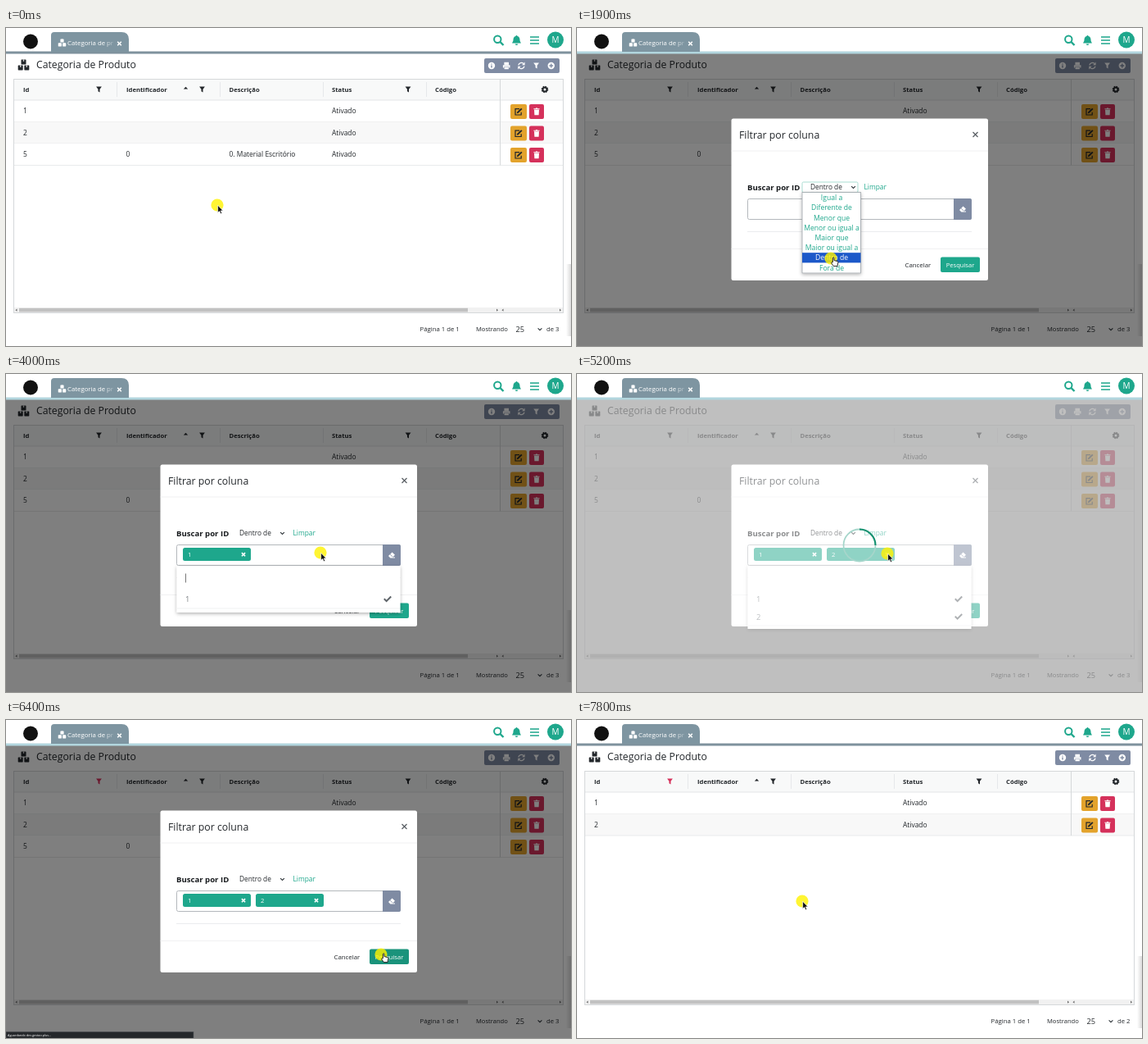
These frames come from a looping animation (690 px wide and 388 px high, 7900 ms). An HTML page:

```html
<!DOCTYPE html>
<html lang="pt">
<head>
<meta charset="utf-8">
<title>Filtrar por coluna</title>
<style>
html, body { margin: 0; width: 100%; height: 100%; overflow: hidden; background: #fff; }
svg { display: block; width: 100%; height: 100%; }
text { font-family: "Open Sans", "Noto Sans", sans-serif; white-space: pre; }
</style>
</head>
<body>
<svg id="stage" viewBox="0 0 690 388" xmlns="http://www.w3.org/2000/svg"></svg>
<script>
const LOOP = 7900, STEP = 100;
const TEAL = '#1ea78c', INK = '#23272b', SLATE = '#7f8ba3', RED = '#d5315b';

// Markup helpers
const text = (x, y, size, str, fill = INK, extra = '') =>
  `<text x="${x}" y="${y}" font-size="${size}" fill="${fill}" ${extra}>${str}</text>`;
const rect = (x, y, w, h, fill, extra = '') =>
  `<rect x="${x}" y="${y}" width="${w}" height="${h}" fill="${fill}" ${extra}/>`;
const path = (d, fill, extra = '') => `<path d="${d}" fill="${fill}" ${extra}/>`;
const line = (d, color, width = 1, extra = '') =>
  path(d, 'none', `stroke="${color}" stroke-width="${width}" ${extra}`);
const at = (x, y, body, scale = 1) => `<g transform="translate(${x} ${y}) scale(${scale})">${body}</g>`;
const group = (id, body, extra = '') => `<g id="${id}" ${extra}>${body}</g>`;
const BOLD = 'font-weight="700"', MID = 'text-anchor="middle"';

// Icons, centred on the origin
const funnel = fill => path('M-3.4-3.4H3.4L1-.2V3.6L-1 2.2V-.2Z', fill, 'stroke="currentColor" stroke-width="0"');
const cross = (r, color, w) => line(`M${-r} ${-r}L${r} ${r}M${r} ${-r}L${-r} ${r}`, color, w);
const chevron = line('M-2.4-1.2L0 1.2L2.4-1.2', '#30363b', 1.1);
const tick = line('M-4.2 0L-1.4 2.8L4.2-2.8', '#5d6368', 2);
const box = (x, y) => rect(x, y, 6, 6, 'currentColor', 'rx=".6"') + rect(x + 2.3, y, 1.4, 2.4, '#fff', 'opacity=".8"');
const boxes = color => `<g color="${color}">${box(-3, -6.6)}${box(-6.8, .4)}${box(.8, .4)}</g>`;
const gear = `<circle r="2.5" fill="none" stroke="${INK}" stroke-width="2"/>` +
  `<circle r="3.7" fill="none" stroke="${INK}" stroke-width="1.2" stroke-dasharray="1.6 1.306"/>`;
const search = `<circle cx="-1.2" cy="-1.2" r="4.2" fill="none" stroke="${TEAL}" stroke-width="2"/>` +
  line('M2 2L6 6', TEAL, 2.4);
const bell = path('M0-6C.8-6 1-5.4 1-5C3.4-4.5 4-2.6 4-.6C4 1.8 5.4 2.4 5.4 3.6H-5.4C-5.4 2.4-4 1.8-4-.6C-4-2.6-3.4-4.5-1-5C-1-5.4-.8-6 0-6ZM-1.6 4.4H1.6A1.6 1.6 0 0 1-1.6 4.4Z', TEAL);
const bars = line('M-5.5-4H5.5M-5.5 0H5.5M-5.5 4H5.5', TEAL, 1.7);
const disc = mark => `<circle r="4.2" fill="#fff"/>` + line(mark, SLATE, 1.4);
const printer = path('M-2.8-4.2H2.8V-1H-2.8ZM-4.3-.8H4.3V2.6H3V1.2H-3V2.6H-4.3ZM-2.6 1.8H2.6V4.2H-2.6Z', '#fff');
const refresh = line('M-3.6-.7A3.7 3.7 0 0 1 2.6-2.6M3.6.7A3.7 3.7 0 0 1-2.6 2.6', '#fff', 1.3) +
  path('M4.2-4.4V-.8H.7ZM-4.2 4.4V.8H-.7Z', '#fff');
const pencil = line('M1-3.3H-4V4H3.2V.8', INK, 1.2) + line('M-1 1L3.8-3.6', INK, 2) + path('M-2.2 2.2L-1.8.1L0 1.8Z', INK);
const trash = path('M-3.6-3.8H-1.2L-.8-4.5H.8L1.2-3.8H3.6V-2.8H-3.6ZM-3-2.2H3L2.6 4.2H-2.6Z', '#fff');
const eraser = path('M-4 1L.6-3.6L4-.2L1.2 2.6H4V3.6H-1.6Z', '#fff') + line('M-1.8-.9L1.4 2.2', SLATE, .8);

const row = (n, label, y, extra = '', fill = '#fff') =>
  rect(10, y, 670, 26.5, fill) +
  text(21, y + 16.2, 8.45, label) + text(398, y + 16.2, 8.45, 'Ativado') + extra +
  line(`M10 ${y + 26.5}H680`, '#e4e6e8', .8) +
  rect(616, y + 5, 20, 18, '#e3a32c', 'rx="2"') + at(626, y + 14, pencil) +
  rect(639, y + 5, 18, 18, RED, 'rx="2"') + at(648, y + 14, trash);

const heading = (x, label) => text(x, 78.2, 7.7, label, INK, BOLD);
const arrow = (x, dir) => path(`M${x - dir} 342.6L${x + dir} 344.2L${x - dir} 345.8Z`, '#666');

function pageMarkup() {
  const tools = [disc('M0-2.6V-1.4M0-.5V2.5'), printer, refresh, funnel('#fff'), disc('M-2.4 0H2.4M0-2.4V2.4')];
  return rect(0, 29, 690, 359, '#fff') +
    at(21.5, 45, boxes(INK)) + text(37, 49.2, 12.25, 'Categoria de Produto') +
    rect(584, 37, 92, 18, SLATE, 'rx="2"') +
    tools.map((icon, i) => at(593 + i * 18.2, 46, icon)).join('') +
    rect(10, 62, 670, 26, '#f8f9f9') +
    row(1, '1', 88) + row(2, '2', 114.5, '', '#f8f8f8') +
    group('row5', row(3, '5', 141, text(146.5, 157.2, 8.45, '0') + text(272.5, 157.2, 8.45, '0. Material Escritório'))) +
    line('M10 88H680', '#dcdfe1', .8) +
    heading(21, 'Id') + heading(147, 'Identificador') + heading(272.5, 'Descrição') +
    heading(398, 'Status') + heading(524, 'Código') +
    group('focus', rect(102.5, 66.5, 22, 17, 'none', 'rx="2" stroke="#c9ecec"')) +
    group('idFilter', at(113.5, 75, funnel('inherit')).replace('fill="inherit"', '')) +
    at(239.5, 75, funnel(INK)) + at(491, 75, funnel(INK)) + at(658, 75, gear) +
    path('M216.8 74.6L219.5 71.8L222.2 74.6Z', INK) +
    line('M135.5 66V84M261.5 66V84M387.5 66V84M513.5 66V84', '#e1e4e6', .8) +
    `<path id="pin" stroke="#d5d8da"/>` +
    rect(10, 341, 670, 6, '#f1f1f1') + rect(16, 341.8, 548, 4.6, '#c1c1c1') +
    arrow(12.5, -1) + arrow(600, 1) + arrow(606.5, -1) + arrow(677, 1) +
    rect(9.5, 62.5, 671, 285, 'none', 'stroke="#d5d8da"') +
    text(505.5, 370.2, 7.75, 'Página 1 de 1') + text(574, 370.2, 7.6, 'Mostrando') +
    text(622.5, 371, 9.2, '25') + at(652, 367.5, chevron) +
    `<text id="total" x="660" y="370.2" font-size="7.7" fill="${INK}"></text>` +
    rect(684, 288, 6, 88, 'url(#edge)');
}

function headerMarkup() {
  return rect(0, 0, 690, 29, '#fff') + rect(0, 28.5, 690, 3, '#7e929d', 'id="rule"') +
    '<circle cx="30" cy="16.5" r="9" fill="#111"/>' +
    path('M55 29V9Q55 5 59 5H141Q150 5 150 14V29Z', '#7e95a1') +
    at(68.5, 18, boxes('#fff'), .7) +
    text(75, 20.6, 7.8, 'Categoria de pr', 'url(#fade)') +
    at(138.5, 19, cross(2.3, '#fff', 1.6)) +
    at(601.5, 15, search) + at(623.5, 15, bell) + at(645.5, 15, bars) +
    `<circle cx="671" cy="14.5" r="10" fill="${TEAL}"/>` + text(671, 18.2, 10, 'M', '#fff', MID);
}

const tag = (id, x, label) => group(id, rect(x, 212, 83, 16, TEAL, 'rx="2.5"') +
  text(x + 6, 222.8, 7.6, label, '#fff') + at(x + 74, 220.2, cross(2.1, '#fff', 1.6)));

const OPTIONS = ['Igual a', 'Diferente de', 'Menor que', 'Menor ou igual a',
  'Maior que', 'Maior ou igual a', 'Dentro de', 'Fora de'];
const LIST_TOP = 201, OPTION_H = 12.2;

function modalMarkup() {
  const option = (label, i) => {
    const y = LIST_TOP + i * OPTION_H;
    return `<g class="option">${rect(275, y, 71.5, OPTION_H, 'none')}` +
      text(311, y + 9.2, 8.6, label, TEAL, MID) + '</g>';
  };
  const found = (id, y, label) => group(id, text(219, y + 3.8, 9.4, label, '#7b8085') + at(466, y, tick));
  return rect(188.5, 110.5, 313.5, 197.5, '#fff', 'rx="2.5"') +
    text(198, 135.3, 12.3, 'Filtrar por coluna') + at(486.5, 130, cross(3, '#5c6166', 1.3)) +
    line('M188.5 150H502M188.5 269.5H502', '#eceeef', .8) +
    text(208, 198.4, 9.6, 'Buscar por ID', '#16191c', BOLD) +
    rect(275, 188, 68, 12.5, '#fff', 'id="selectRing" rx="1.5" stroke="#a9ddd2"') +
    text(285, 197.4, 8.3, 'Dentro de') + at(337.5, 194.3, chevron) +
    text(350.5, 197.4, 8.35, 'Limpar', TEAL) +
    rect(208.5, 208.5, 273, 25, '#fff', 'rx="2" stroke="#b4b8bc"') +
    path('M460 208H480Q482 208 482 210V232Q482 234 480 234H460Z', SLATE) + at(471, 221, eraser) +
    line('M208 248.5H482', '#e6e8ea', .8) +
    text(400.5, 292, 7.85, 'Cancelar') +
    rect(444, 279.5, 48, 18.5, TEAL, 'id="submit" rx="2"') + text(468, 291.8, 7.6, 'Pesquisar', '#fff', MID) +
    tag('tag1', 216, '1') + tag('tag2', 305, '2') +
    group('panel', rect(208.5, 234, 273, 57, '#fff', 'id="panelBox" filter="url(#shadow)"') +
      text(219, 252.6, 9.4, '', '#555', 'id="query"') + `<path id="caret" stroke="#777"/>` +
      `<path id="panelLine" stroke="#eceeef" stroke-width=".8"/>` +
      found('found1', 274.3, '1') + found('found2', 295.8, '2')) +
    group('list', rect(275, 200.5, 71.5, 98.5, '#fff', 'stroke="#9da3a8" stroke-width=".8" filter="url(#shadow)"') +
      OPTIONS.map(option).join(''));
}

const stage = document.getElementById('stage');
stage.innerHTML = `<defs>
  <linearGradient id="edge"><stop offset="0" stop-color="#000" stop-opacity="0"/><stop offset="1" stop-color="#000" stop-opacity=".14"/></linearGradient>
  <linearGradient id="fade" gradientUnits="userSpaceOnUse" x1="120" x2="134" y1="0" y2="0"><stop offset="0" stop-color="#fff"/><stop offset="1" stop-color="#fff" stop-opacity=".1"/></linearGradient>
  <filter id="shadow" x="-10%" y="-20%" width="120%" height="150%"><feDropShadow dx="0" dy="1.5" stdDeviation="2" flood-opacity=".3"/></filter>
</defs>` +
  group('page', pageMarkup()) +
  rect(0, 29, 690, 359, '#000', 'id="dim"') +
  group('modal', modalMarkup()) +
  rect(0, 29, 690, 359, '#fff', 'id="veil"') +
  group('spinner', `<circle cx="345" cy="209" r="19.5" fill="none" stroke="#a6d6cb" stroke-width="1.8"/>` +
    line('M345 189.5A19.5 19.5 0 0 1 364.5 209', '#14906f', 2, 'id="arc"')) +
  headerMarkup() +
  group('status', rect(0, 380.3, 229, 8, '#25282b', 'stroke="#55595c" stroke-width=".6"') +
    text(2, 385.8, 3.8, 'Aguardando dev.gestao.plus...', '#fff')) +
  group('cursor', '<circle r="7.6" fill="#fff200" opacity=".8"/>' +
    group('pointer', path('M.6.2V9.4L2.7 7.5L4.1 10.7L5.7 10L4.3 6.9H7.1Z', '#111', 'stroke="#fff" stroke-width=".7"')) +
    group('hand', path('M2.4 4.8V-.6Q3.2-1.7 4 -.6V2.6L8.2 3.6Q9 4 8.8 5.2L8 9.6H3.4L.6 5.8Q.6 4.4 2.4 4.8Z', '#fff', 'stroke="#111" stroke-width=".9"')));

const el = {};
stage.querySelectorAll('[id]').forEach(node => el[node.id] = node);
const options = [...stage.querySelectorAll('.option')];

const set = (id, name, value) => el[id].setAttribute(name, value);
const show = (id, on) => set(id, 'visibility', on ? 'inherit' : 'hidden');
const ramp = (t, from, to) => Math.min(1, Math.max(0, (t - from) / (to - from)));
const within = (t, from, to) => t >= from && t < to;
const mix = (a, b, k) => `rgb(${a.map((v, i) => Math.round(v + (b[i] - v) * k))})`;

// Pointer stops: time, x, y
const STOPS = [
  [0, 258, 216], [300, 114, 76], [400, 114, 76], [600, 154, 114], [800, 226, 160],
  [1100, 305, 194], [1300, 305, 194], [1800, 310, 281], [2100, 310, 281],
  [2500, 384, 218], [4200, 384, 218], [4700, 379, 219], [5300, 379, 219],
  [6000, 458, 286], [6600, 458, 286], [7400, 275, 221], [7900, 275, 221]
];

function slope(i, axis) {
  const a = STOPS[i - 1], b = STOPS[i], c = STOPS[i + 1];
  if (!a || !c || a[axis] === b[axis] || b[axis] === c[axis]) return 0;
  return (c[axis] - a[axis]) / (c[0] - a[0]);
}

function pointerAt(t) {
  const i = STOPS.findIndex((stop, k) => k && t < stop[0]);
  const a = STOPS[i - 1], b = STOPS[i], span = b[0] - a[0], u = (t - a[0]) / span;
  const ease = u * u * (3 - 2 * u);
  return [1, 2].map(axis => a[axis] + (b[axis] - a[axis]) * ease +
    span * u * (1 - u) * ((1 - u) * slope(i - 1, axis) - u * slope(i, axis)));
}

function draw(t) {
  const [x, y] = pointerAt(t);
  const closing = ramp(t, 6400, 6600);
  const dim = ramp(t, 400, 550) * (1 - closing);
  const rise = (1 - ramp(t, 400, 700)) ** 2 + closing ** 2;
  const filtered = t >= 6700, second = t >= 5100;

  show('row5', !filtered);
  el.total.textContent = filtered ? 'de 2' : 'de 3';
  set('pin', 'd', `M603.5 62V${filtered ? 141 : 167.5}`);
  set('idFilter', 'fill', t >= 6300 ? RED : INK);
  show('focus', within(t, 300, 900));
  set('rule', 'fill', mix([126, 146, 157], [178, 214, 222], dim));

  set('dim', 'opacity', dim * .5);
  set('modal', 'opacity', dim);
  set('modal', 'transform', `translate(0 ${-50 * rise})`);
  show('modal', dim > 0);

  const open = within(t, 1300, 2100);
  show('selectRing', within(t, 1200, 2500));
  show('list', open);
  const hover = y > LIST_TOP ? Math.floor((y - LIST_TOP) / OPTION_H) : 6;
  options.forEach((node, i) => {
    node.firstChild.setAttribute('fill', i === hover ? '#1c58c9' : 'none');
    node.lastChild.setAttribute('fill', i === hover ? '#fff' : TEAL);
  });

  show('tag1', t >= 3500);
  show('tag2', second);
  show('panel', within(t, 2700, 5500));
  set('panelBox', 'height', second ? 77 : 57);
  set('panelLine', 'd', `M209 ${second ? 307 : 286}H481`);
  show('found1', within(t, 3500, 5500));
  show('found2', within(t, 5100, 5500));
  const query = within(t, 3100, 3500) ? '1' : within(t, 4600, 5100) ? '2' : '';
  el.query.textContent = query;
  set('caret', 'd', `M${query ? 225.5 : 219.5} 243.5V254.5`);
  const blink = Math.floor((t + 100) / 500) % 2 === 0;
  show('caret', within(t, 2700, 5100) && (query || blink));
  set('submit', 'fill', within(t, 5900, 6600) ? '#1a937b' : TEAL);

  const load = ramp(t, 5100, 5200) * (1 - ramp(t, 5400, 5600));
  set('veil', 'opacity', load * .5);
  set('spinner', 'opacity', load);
  set('arc', 'transform', `rotate(${(t - 5200) * .45} 345 209)`);
  show('status', within(t, 6300, 6900));

  const hand = within(t, 300, 500) || within(t, 1500, 2100) || within(t, 5900, 6700);
  set('cursor', 'transform', `translate(${x} ${y})`);
  show('hand', hand);
  show('pointer', !hand);
}

function tick60(now) {
  draw(Math.floor(now % LOOP / STEP) * STEP);
  requestAnimationFrame(tick60);
}
draw(0);
requestAnimationFrame(tick60);
</script>
</body>
</html>
```
